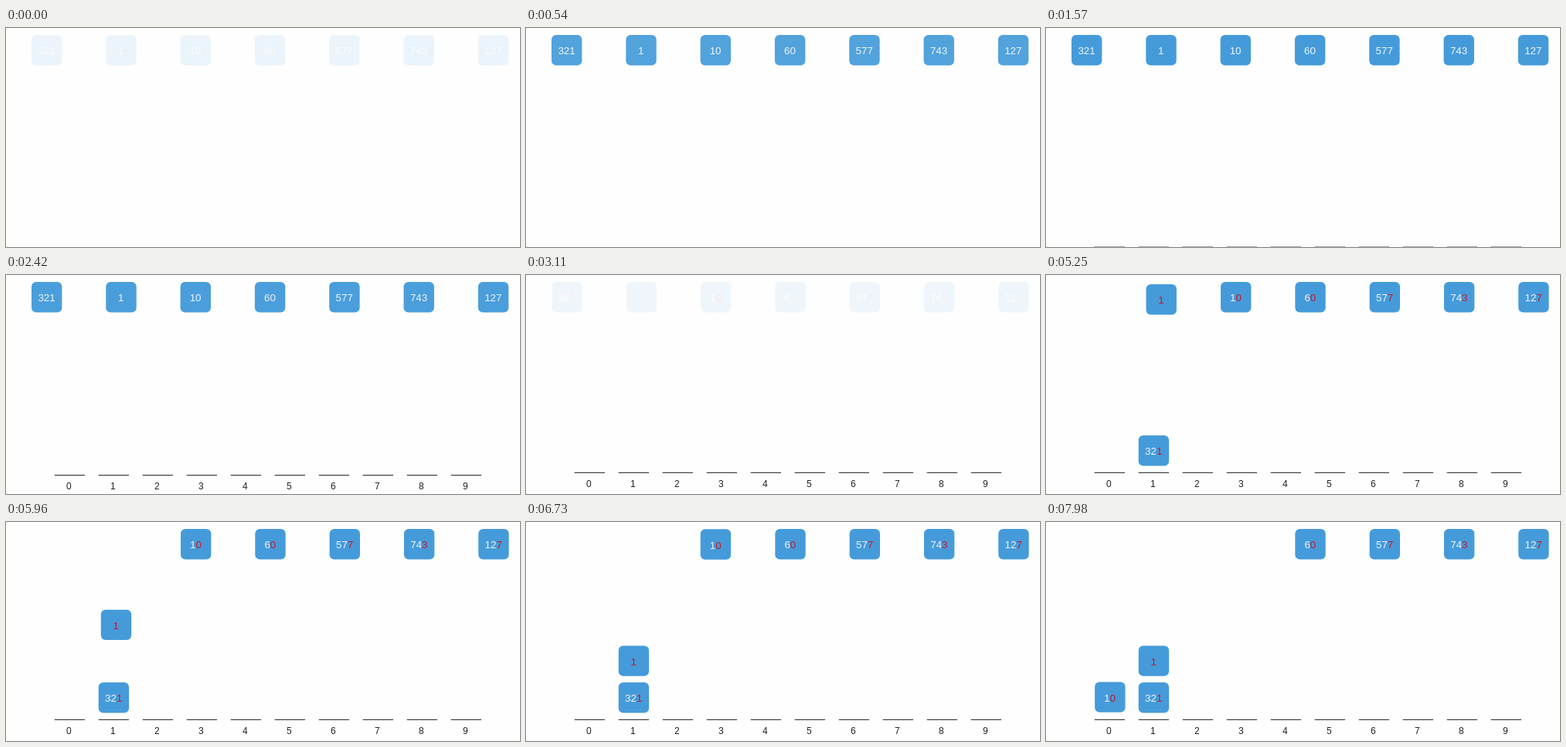
Recreate the animation shown at these times as an HTML page. Size 665 px wide and 284 px high, loop 8000 ms.

```html
<!DOCTYPE html>
<html lang="en">
<head>
<meta charset="utf-8">
<title>Radix sort</title>
<style>
  html, body { margin: 0; width: 100%; height: 100%; overflow: hidden; background: #fefefe; }
  svg { display: block; }
  text { font: 13.3px "Liberation Sans", Arial, sans-serif; text-anchor: middle; fill: #f0f6fb; }
  rect { fill: #459bda; }
  .digit { fill: #cc1428; }
  .bucket text { font-size: 12px; fill: #222; }
  .bucket path { stroke: #444; stroke-width: 1.2; }
</style>
</head>
<body>
<svg id="stage" width="665" height="284" viewBox="0 0 665 284">
  <g id="buckets"></g>
  <g id="plain"></g>
  <g id="marked"></g>
</svg>
<script>
const LOOP = 8000;
const MOVE = 1330, MOVE_START = 3565, MOVE_GAP = 1565;
const FADE = 650;
const TOP = 9, GAP = 96.3, BUCKET_X = 62.7, BUCKET_GAP = 57;
const values = ["321", "1", "10", "60", "577", "743", "127"];
// Bucket and stack level for each value that gets sorted
const targets = [[1, 0], [1, 1], [0, 0]];

const byId = id => document.getElementById(id);
const clamp = x => Math.min(1, Math.max(0, x));
const ease = x => (1 - Math.cos(Math.PI * clamp(x))) / 2;
const place = (el, x, y) => el.setAttribute("transform", `translate(${x} ${y})`);

const box = label => `<g><rect width="39.4" height="39.4" rx="6"/><text x="19.5" y="25.3">${label}</text></g>`;
const markLast = v => `${v.slice(0, -1)}<tspan class="digit">${v.slice(-1)}</tspan>`;

byId("plain").innerHTML = values.map(box).join("");
byId("marked").innerHTML = values.map(v => box(markLast(v))).join("");
byId("buckets").innerHTML = [...Array(10).keys()].map(i =>
  `<g class="bucket" transform="translate(${BUCKET_X + BUCKET_GAP * i})">
     <path d="M0 256.4h39.3"/><text x="18.7" y="274.8">${i}</text>
   </g>`).join("");

const plain = [...byId("plain").children];
const marked = [...byId("marked").children];
plain.forEach((el, i) => place(el, 33 + GAP * i, TOP));

function draw(t) {
  const fadeIn = clamp((t + 60) / FADE);
  const fadeOut = clamp((t - 2400) / FADE);
  const markedIn = clamp((t - 3062) / FADE);
  plain.forEach(el => el.style.opacity = fadeIn * (1 - fadeOut));
  place(byId("buckets"), 0, 28.5 * (1 - ease((t - 1430) / 1270)));

  marked.forEach((el, i) => {
    const x = 33.4 + GAP * i;
    el.style.opacity = markedIn;
    if (!targets[i]) return place(el, x, TOP);
    const [bucket, level] = targets[i];
    const p = ease((t - MOVE_START - MOVE_GAP * i) / MOVE);
    const endX = BUCKET_X + BUCKET_GAP * bucket, endY = 208 - 47.6 * level;
    place(el, x + (endX - x) * p, TOP + (endY - TOP) * p);
  });
}

const start = performance.now();
function tick() {
  draw((performance.now() - start) % LOOP);
  requestAnimationFrame(tick);
}
tick();
</script>
</body>
</html>
```
